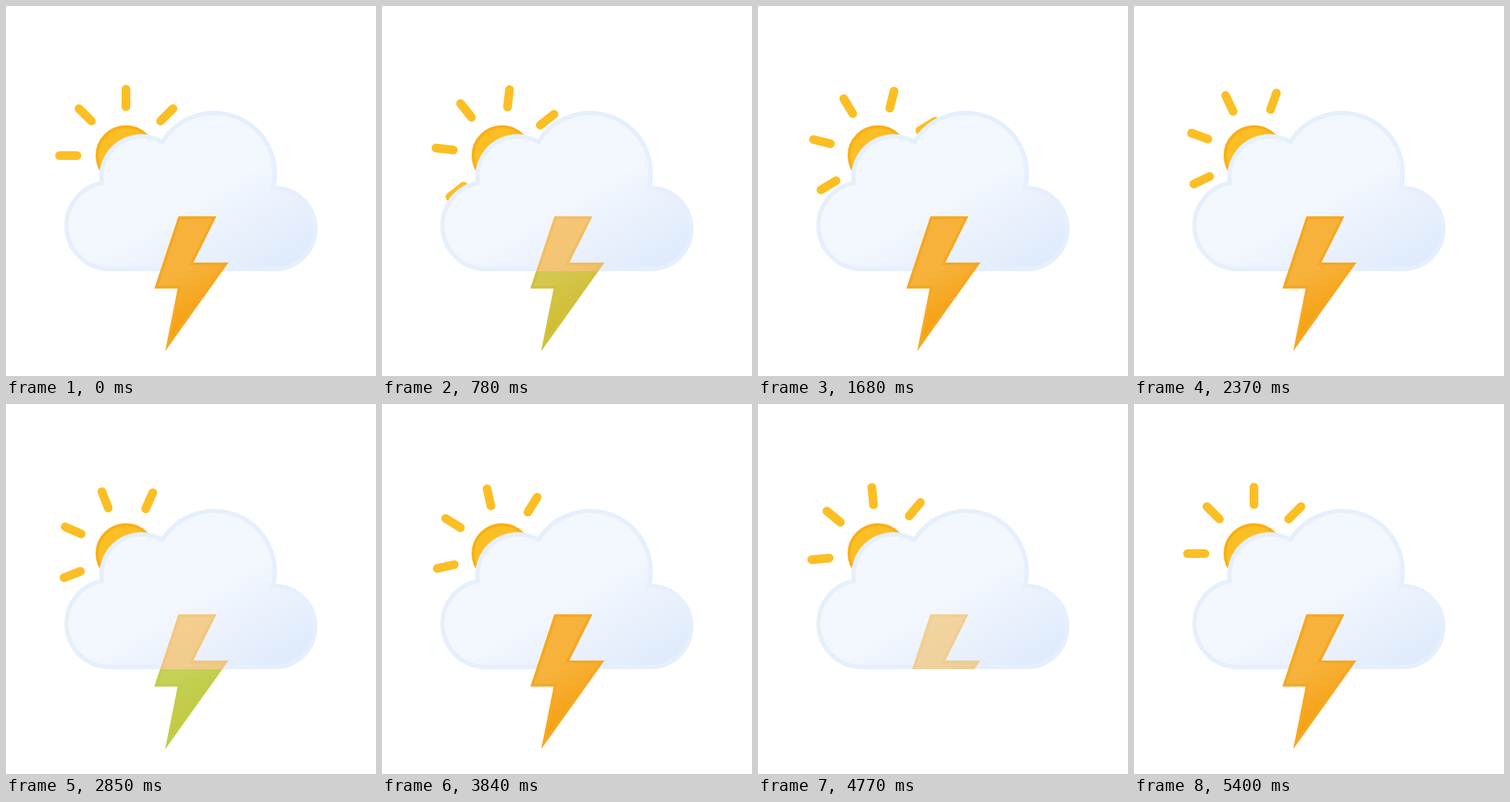
Animation of 512 by 512 pixels, one loop 5430 ms. Source, as an HTML page:

```html
<!DOCTYPE html>
<html lang="en">
<head>
<meta charset="utf-8">
<title>Thunderstorm by day</title>
<style>
  html, body { margin: 0; height: 100%; overflow: hidden; background: #fff; }
  svg { display: block; width: 100vw; height: 100vh; }
</style>
</head>
<body>
<svg viewBox="0 0 512 512">
  <defs>
    <linearGradient id="sunFill" gradientUnits="userSpaceOnUse" x1="-20" y1="-34.6" x2="20" y2="34.7">
      <stop offset=".45" stop-color="#fbbf24"/>
      <stop offset="1" stop-color="#f59e0b"/>
    </linearGradient>
    <linearGradient id="cloudFill" gradientUnits="userSpaceOnUse" x1="99.5" y1="30.7" x2="232.6" y2="261.4">
      <stop offset=".45" stop-color="#f3f7fe"/>
      <stop offset="1" stop-color="#deeafb"/>
    </linearGradient>
    <linearGradient id="boltFill" gradientUnits="userSpaceOnUse" x1="8.7" y1="17.1" x2="80.9" y2="142.1">
      <stop offset=".45" stop-color="#f7b23b"/>
      <stop offset="1" stop-color="#f59e0b"/>
    </linearGradient>
    <path id="boltShape" transform="translate(205.2 291)" stroke-width="4" stroke-miterlimit="10"
      d="M34.8 2l-32 96h32l-16 80 80-112h-48l32-64z"/>
    <clipPath id="visible"><rect id="visibleArea" width="512" height="512"/></clipPath>
  </defs>

  <g transform="translate(166 207)">
    <circle r="40" fill="url(#sunFill)" stroke="#f8af18" stroke-width="4"/>
    <g id="rays" stroke="#fbbf24" stroke-width="12" stroke-linecap="round"/>
  </g>

  <use id="glow" href="#boltShape" fill="#80ff80" stroke="#80ff80"/>

  <path transform="translate(81 145)" fill="url(#cloudFill)" stroke="#e6effc" stroke-width="6" stroke-miterlimit="10"
    d="M291 107l-2.5.1A83.9 83.9 0 0 0 135.6 43 56 56 0 0 0 51 91a56.6 56.6 0 0 0 .8 9A60 60 0 0 0 63 219l4-.2v.2h224a56 56 0 0 0 0-112Z"/>

  <g clip-path="url(#visible)">
    <use id="bolt" href="#boltShape" fill="url(#boltFill)" stroke="#f6a823"/>
  </g>
</svg>

<script>
  const STEP = 30, LOOP = 5430, TURN = 5400;
  const FLASH_PERIOD = 1800, FLASH_START = 738, FADE = 126;
  const CLOUD_BOTTOM = 367;
  const byId = id => document.getElementById(id);
  const rays = byId('rays'), bolt = byId('bolt'), glow = byId('glow'), area = byId('visibleArea');

  for (let angle = 0; angle < 360; angle += 45) {
    rays.insertAdjacentHTML('beforeend', `<path d="M0-67.7V-92" transform="rotate(${angle})"/>`);
  }

  // Two quick dips from full to a tenth and back.
  function flash(time) {
    const phase = (time % FLASH_PERIOD - FLASH_START) / FADE;
    if (phase <= 0 || phase >= 4) return 1;
    return 0.1 + 0.9 * Math.abs(1 - phase % 2);
  }

  function render(time) {
    const opacity = flash(time);
    const strong = opacity >= 0.5;
    rays.setAttribute('transform', `rotate(${time / TURN * 45})`);
    bolt.setAttribute('opacity', opacity);
    glow.setAttribute('visibility', strong && opacity < 1 ? 'visible' : 'hidden');
    // A weak bolt shows only in front of the cloud.
    area.setAttribute('height', strong ? 512 : CLOUD_BOTTOM);
  }

  const start = performance.now();
  function tick() {
    const time = (performance.now() - start) % LOOP;
    render(Math.floor(time / STEP) * STEP);
    requestAnimationFrame(tick);
  }
  tick();
</script>
</body>
</html>
```
